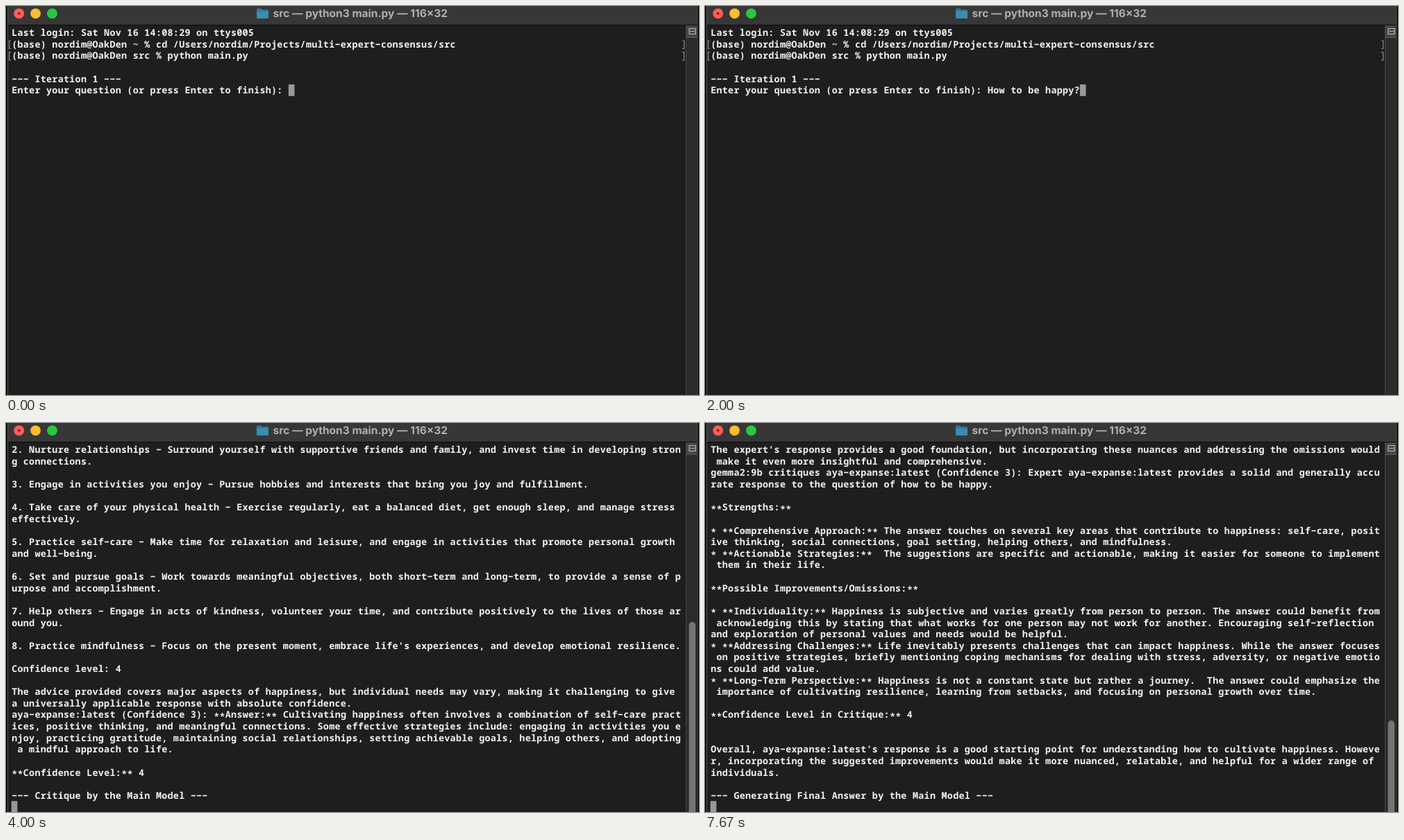
Write an HTML page that moves like this. It is 998 px wide and 561 px high and loops after 8000 ms.

```html
<!DOCTYPE html>
<html lang="en">
<head>
<meta charset="utf-8">
<title>Terminal</title>
<style>
html, body { margin: 0; width: 100%; height: 100%; overflow: hidden; background: #000; }
svg { display: block; width: 998px; height: 561px; }
text { text-rendering: geometricPrecision; }
#rows text {
  font: 600 13.4px "Noto Sans Mono", "DejaVu Sans Mono", monospace;
  letter-spacing: .274px;
  white-space: pre;
  fill: #f2f2f2;
}
#title { font: 700 15.5px Inter, sans-serif; fill: #b0b0b0; }
</style>
</head>
<body>
<svg viewBox="0 0 998 561">
  <rect width="998" height="561" fill="#000"/>
  <rect x="2.5" y="-12" width="993.5" height="600" rx="10" fill="#1e1e1e" stroke="#5c5c5c"/>
  <path d="M3 0H995.5V27H3Z" fill="#373737"/>
  <path d="M3 27.5H995.5" stroke="#0c0c0c"/>

  <circle cx="18.7" cy="10.8" r="7.4" fill="#ff5f57"/>
  <circle cx="18.7" cy="10.8" r="1.8" fill="#7d0f0a"/>
  <circle cx="42.6" cy="10.8" r="7.4" fill="#febc2e"/>
  <circle cx="66.5" cy="10.8" r="7.4" fill="#28c840"/>

  <path d="M361 5q0-1.5 1.5-1.5h4.5l2 1.7h7.5q1.5 0 1.5 1.5v10q0 1.3-1.5 1.3h-14q-1.5 0-1.5-1.3z" fill="#2f7898"/>
  <path d="M361 7.6h17v9.1q0 1.3-1.5 1.3h-14q-1.5 0-1.5-1.3z" fill="#3b8caf"/>
  <text id="title" x="510.3" y="16.2" text-anchor="middle">src — python3 main.py — 116×32</text>

  <rect x="979" y="28" width="16.5" height="533" fill="#2b2b2b"/>
  <path d="M979.5 28V561" stroke="#484848"/>
  <rect x="980" y="28" width="15.5" height="17" fill="#474747"/>
  <path d="M980 45.5H995.5" stroke="#5a5a5a"/>
  <path d="M984 32.5h9v8h-9zM985.5 36.5h6" fill="none" stroke="#bdbdbd" stroke-width="1.2"/>
  <rect id="thumb" x="983.5" width="9.5" height="320" rx="4.7" fill="#757575"/>

  <g id="marks" fill="none" stroke="#8c8c8c" stroke-width="1.2">
    <path d="M7 50H4.6V61.5H7M974 50H976.6V61.5H974"/>
    <path d="M7 66.6H4.6V78.1H7M974 66.6H976.6V78.1H974"/>
  </g>
  <rect id="cursor" width="8.6" height="16.7" fill="#999"/>
  <g id="rows"></g>
</svg>
<script>
const LOOP = 8000, LEFT = 8.2, TOP = 30.2, COL = 8.314, ROW = 16.62, STAR_DROP = 2.3;
const QUESTION = "How to be happy?";

const intro = `Last login: Sat Nov 16 14:08:29 on ttys005
(base) nordim@OakDen ~ % cd /Users/nordim/Projects/multi-expert-consensus/src
(base) nordim@OakDen src % python main.py

--- Iteration 1 ---
Enter your question (or press Enter to finish): `;

const answers = `2. Nurture relationships - Surround yourself with supportive friends and family, and invest time in developing stron
g connections.

3. Engage in activities you enjoy - Pursue hobbies and interests that bring you joy and fulfillment.

4. Take care of your physical health - Exercise regularly, eat a balanced diet, get enough sleep, and manage stress
effectively.

5. Practice self-care - Make time for relaxation and leisure, and engage in activities that promote personal growth
and well-being.

6. Set and pursue goals - Work towards meaningful objectives, both short-term and long-term, to provide a sense of p
urpose and accomplishment.

7. Help others - Engage in acts of kindness, volunteer your time, and contribute positively to the lives of those ar
ound you.

8. Practice mindfulness - Focus on the present moment, embrace life's experiences, and develop emotional resilience.

Confidence level: 4

The advice provided covers major aspects of happiness, but individual needs may vary, making it challenging to give
a universally applicable response with absolute confidence.
aya-expanse:latest (Confidence 3): **Answer:** Cultivating happiness often involves a combination of self-care pract
ices, positive thinking, and meaningful connections. Some effective strategies include: engaging in activities you e
njoy, practicing gratitude, maintaining social relationships, setting achievable goals, helping others, and adopting
 a mindful approach to life.

**Confidence Level:** 4

--- Critique by the Main Model ---
`;

const critique = `The expert's response provides a good foundation, but incorporating these nuances and addressing the omissions would
 make it even more insightful and comprehensive.
gemma2:9b critiques aya-expanse:latest (Confidence 3): Expert aya-expanse:latest provides a solid and generally accu
rate response to the question of how to be happy.

**Strengths:**

* **Comprehensive Approach:** The answer touches on several key areas that contribute to happiness: self-care, posit
ive thinking, social connections, goal setting, helping others, and mindfulness.
* **Actionable Strategies:**  The suggestions are specific and actionable, making it easier for someone to implement
 them in their life.

**Possible Improvements/Omissions:**

* **Individuality:** Happiness is subjective and varies greatly from person to person. The answer could benefit from
 acknowledging this by stating that what works for one person may not work for another. Encouraging self-reflection
and exploration of personal values and needs would be helpful.
* **Addressing Challenges:** Life inevitably presents challenges that can impact happiness. While the answer focuses
 on positive strategies, briefly mentioning coping mechanisms for dealing with stress, adversity, or negative emotio
ns could add value.
* **Long-Term Perspective:** Happiness is not a constant state but rather a journey.  The answer could emphasize the
 importance of cultivating resilience, learning from setbacks, and focusing on personal growth over time.

**Confidence Level in Critique:** 4


Overall, aya-expanse:latest's response is a good starting point for understanding how to cultivate happiness. Howeve
r, incorporating the suggested improvements would make it more nuanced, relatable, and helpful for a wider range of
individuals.

--- Generating Final Answer by the Main Model ---
`;

// Each screen: start time, text, scroll thumb top (null = no thumb)
const screens = [
  [0, intro, null],
  [1670, intro + QUESTION.slice(0, -1), null],
  [2000, intro + QUESTION, null],
  [2330, intro + QUESTION + "\n", null],
  [3330, answers, 287],
  [6000, critique, 429]
];

const $ = id => document.getElementById(id);
const make = (tag, attrs) => {
  const el = document.createElementNS("http://www.w3.org/2000/svg", tag);
  for (const key in attrs) el.setAttribute(key, attrs[key]);
  return el;
};
const rows = Array.from({ length: 32 }, (_, i) =>
  $("rows").appendChild(make("text", { x: LEFT })));

// The terminal face has long dashes and asterisks at mid height
function setLine(row, index, line) {
  const base = TOP + 13 + index * ROW;
  const parts = line.replace(/-/g, "−").split(/(\*+)/);
  let col = 0;
  row.replaceChildren(...parts.filter(Boolean).map(part => {
    const span = make("tspan", {
      x: LEFT + col * COL,
      y: part[0] === "*" ? base + STAR_DROP : base
    });
    span.textContent = part;
    col += part.length;
    return span;
  }));
}

let shown = null;
function show(screen) {
  if (screen === shown) return;
  shown = screen;
  const [, text, thumb] = screen;
  const lines = text.split("\n"), last = lines.length - 1;
  rows.forEach((row, i) => setLine(row, i, lines[i] || ""));
  $("cursor").setAttribute("x", LEFT - .4 + lines[last].length * COL);
  $("cursor").setAttribute("y", TOP - .2 + last * ROW);
  $("marks").style.display = thumb === null ? "" : "none";
  $("thumb").style.display = thumb === null ? "none" : "";
  $("thumb").setAttribute("y", thumb || 0);
}

function frame(now) {
  const time = now % LOOP;
  show(screens.filter(s => s[0] <= time).pop());
  requestAnimationFrame(frame);
}
show(screens[0]);
requestAnimationFrame(frame);
</script>
</body>
</html>
```
